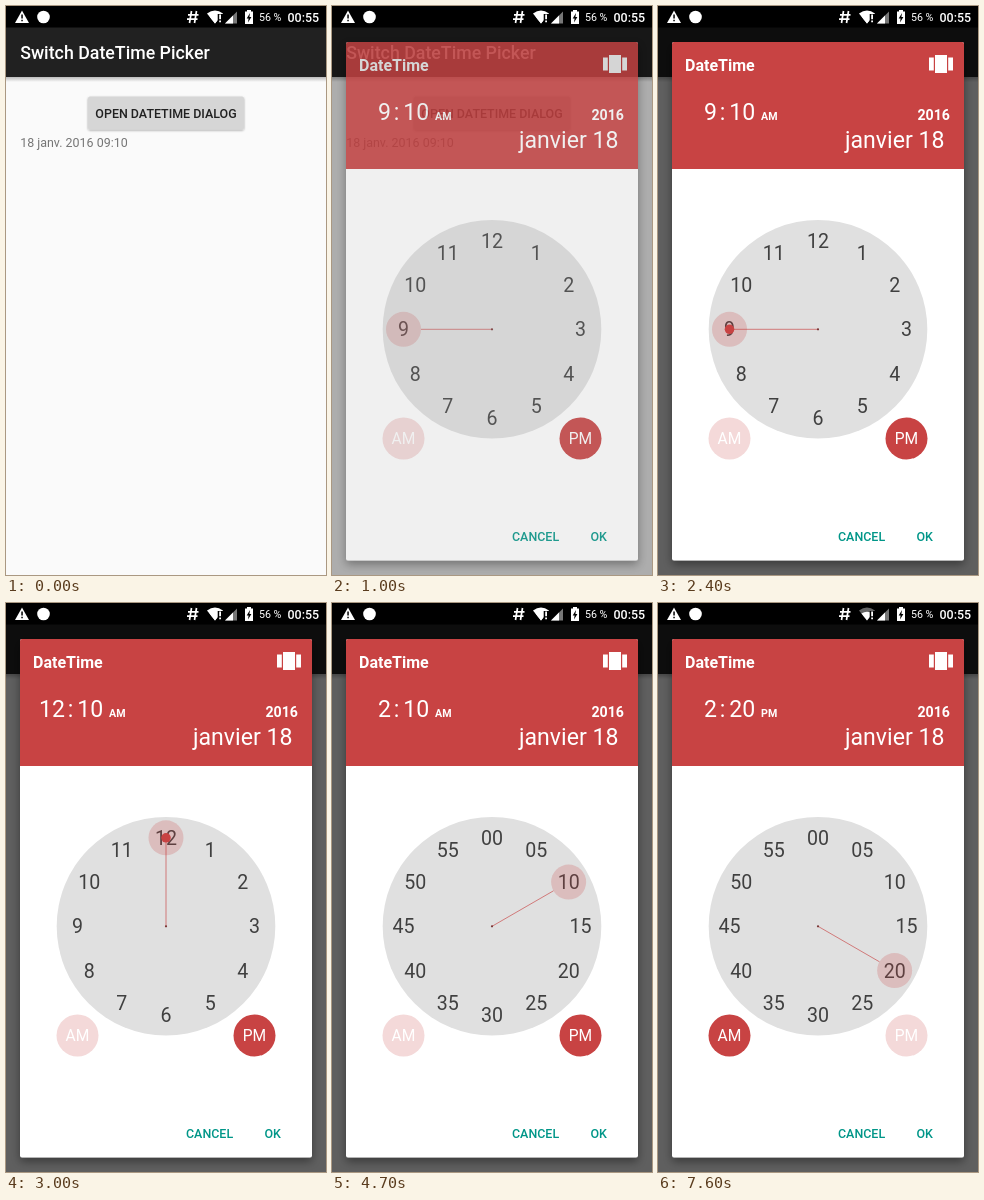
Recreate the animation shown at these times as an HTML page. Size 320 px wide and 569 px high, loop 8 s.

```html
<!DOCTYPE html>
<html lang="fr">
<head>
<meta charset="utf-8">
<title>Switch DateTime Picker</title>
<style>
html, body { margin: 0; width: 100%; height: 100%; overflow: hidden; background: #fafafa; }
svg { display: block; width: 100vw; height: 100vh; font-family: Roboto, sans-serif; }
.m { font-weight: 500; }
.b { font-weight: 700; }
.w { fill: #fff; }
.c { text-anchor: middle; }
.s { font-size: 12.44px; }
.num { font-size: 19.6px; fill: #404040; }
.big { font-size: 23.1px; }
.red { fill: #c84343; }
.half { font-size: 15.6px; }
</style>
</head>
<body>
<svg viewBox="0 0 320 569">
  <defs>
    <linearGradient id="fall" x2="0" y2="1">
      <stop stop-opacity=".25"/><stop offset="1" stop-opacity="0"/>
    </linearGradient>
    <filter id="lift" x="-10%" y="-10%" width="120%" height="120%">
      <feDropShadow dx="0" dy="4" stdDeviation="5" flood-opacity=".4"/>
    </filter>
    <filter id="small" x="-10%" y="-20%" width="120%" height="150%">
      <feDropShadow dx="0" dy="1" stdDeviation=".8" flood-opacity=".35"/>
    </filter>
  </defs>

  <!-- Page -->
  <rect width="320" height="569" fill="#fafafa"/>
  <rect y="71" width="320" height="5" fill="url(#fall)"/>
  <rect width="320" height="71" fill="#212121"/>
  <text class="m w" x="14.2" y="53" font-size="17.78">Switch DateTime Picker</text>
  <rect x="82" y="90.5" width="156" height="33" rx="2" fill="#d6d6d6" filter="url(#small)"/>
  <text class="m s c" x="160" y="111.5" fill="#212121">OPEN DATETIME DIALOG</text>
  <text class="s" x="14.2" y="141" fill="#757575">18 janv. 2016 09:10</text>
  <rect id="dim" width="320" height="569"/>

  <!-- Status bar -->
  <rect width="320" height="21.5"/>
  <g class="w">
    <path d="M16 4.5L23 17H9Z"/>
    <path d="M15.3 8.5h1.5v4h-1.5zM15.3 13.8h1.5v1.5h-1.5z" fill="#000"/>
    <circle cx="37.5" cy="11" r="6.3"/>
    <path d="M185.5 5L183.5 17M190.5 5L188.5 17M182 8.8H192.5M181 13.2H191.5" stroke="#fff" stroke-width="1.7"/>
    <path id="wifi" d="M201 7.5Q209 1.5 217 7.5L209 17.5Z"/>
    <path d="M203.4 10.5Q209 7 214.6 10.5L209 17.5Z"/>
    <path d="M211.7 8h6v10h-6z" fill="#000"/>
    <path d="M213.2 8.5h1.8v4.8h-1.8zM213.2 14.5h1.8v1.8h-1.8z"/>
    <path d="M219 17.5H231V5.5Z" fill="#777"/>
    <path d="M219 17.5H227V9.5Z"/>
    <path d="M239 5.5h2v-1.5h4v1.5h2v12.5h-8z"/>
    <path d="M244 7L240.7 12.5H242.6L242 16.5L245.4 11H243.4Z" fill="#000"/>
    <text x="253" y="15" font-size="10.67">56 %</text>
    <text class="m s" x="281.5" y="15.5">00:55</text>
  </g>

  <!-- Dialog -->
  <g id="dialog">
    <rect x="14" y="36" width="292" height="518.5" rx="2" class="w" filter="url(#lift)"/>
    <path class="red" d="M14 163V38q0-2 2-2H304q2 0 2 2V163Z"/>
    <g class="w">
      <text class="b" x="27" y="65" font-size="16">DateTime</text>
      <path d="M277 49h12v18h-12zM271 51.5h4.8v13h-4.8zM290.2 51.5h4.8v13h-4.8z"/>
      <text id="hour" class="big" x="59" y="114" text-anchor="end"></text>
      <text class="big c" x="64.5" y="114">:</text>
      <text id="minute" class="big c" y="8.2"></text>
      <text id="period" class="b" x="103" y="114" font-size="10.67"></text>
      <text class="b" x="292" y="114" font-size="14.2" text-anchor="end">2016</text>
      <text class="big" x="187" y="142">janvier 18</text>
    </g>
    <circle cx="160" cy="323.3" r="109.3" fill="#e0e0e0"/>
    <g id="am"><circle class="red" cx="71.5" cy="432.5" r="21"/></g>
    <g id="pm"><circle class="red" cx="248.5" cy="432.5" r="21"/></g>
    <text class="half w c" x="71.5" y="438">AM</text>
    <text class="half w c" x="248.5" y="438">PM</text>
    <g id="rings"></g>
    <circle cx="160" cy="323.3" r="1.1" fill="#733"/>
    <g class="m s" fill="#009688">
      <text x="180" y="535">CANCEL</text>
      <text x="258.5" y="535">OK</text>
    </g>
  </g>
</svg>
<script>
const LOOP = 8000, STEP = 100;
const CX = 160, CY = 323.3, R = 88.5, KNOB = 17.5;
const SWITCH = 3780;             // hours give way to minutes
const $ = id => document.getElementById(id);
const pad = n => String(n).padStart(2, '0');
const clamp = x => Math.min(1, Math.max(0, x));
const ease = x => (1 - Math.cos(Math.PI * clamp(x))) / 2;

function add(parent, tag, attrs) {
  const el = document.createElementNS('http://www.w3.org/2000/svg', tag);
  parent.append(el);
  return set(el, attrs);
}
function set(el, attrs) {
  for (const k in attrs) el.setAttribute(k, attrs[k]);
  return el;
}
function polar(deg, r) {
  const a = deg * Math.PI / 180;
  return [CX + r * Math.sin(a), CY - r * Math.cos(a)];
}
// Piecewise linear value through [position, value] pairs
function track(x, keys) {
  const i = keys.findIndex(k => k[0] >= x);
  if (i < 0) return keys[keys.length - 1][1];
  if (i === 0) return keys[0][1];
  const [x0, v0] = keys[i - 1], [x1, v1] = keys[i];
  return v0 + (v1 - v0) * (x - x0) / (x1 - x0);
}

function makeRing(label) {
  const g = add($('rings'), 'g', {});
  const texts = Array.from({ length: 12 }, (_, i) => {
    const el = add(g, 'text', { class: 'num c' });
    el.textContent = label(i);
    return el;
  });
  const knob = add(g, 'circle', { class: 'red', r: KNOB, opacity: .22 });
  const line = add(g, 'line', { x1: CX, y1: CY, stroke: '#c84343', 'stroke-opacity': .65 });
  const dot = add(g, 'circle', { class: 'red', r: 4.8 });
  return (deg, touched, scale, alpha) => {
    const r = R * scale, [x, y] = polar(deg, r);
    const [x2, y2] = polar(deg, touched ? r : r - KNOB);
    set(g, { opacity: alpha });
    texts.forEach((el, i) => {
      const [tx, ty] = polar(i * 30, r);
      set(el, { x: tx, y: ty + 7 });
    });
    set(knob, { cx: x, cy: y });
    set(line, { x2, y2 });
    set(dot, { cx: x, cy: y, opacity: +touched });
  };
}
const hours = makeRing(i => i || 12);
const minutes = makeRing(i => pad(i * 5));

function draw(t) {
  const opening = t < 1100;
  set($('dim'), { opacity: t < 1000 ? 0 : opening ? .31 : .62 });
  set($('dialog'), { opacity: t < 1000 ? 0 : opening ? .82 : 1 });
  set($('wifi'), { fill: t < 7600 ? '#fff' : '#666' });

  const hour = 9 + [2600, 2800, 3000, 3300, 3500].filter(s => t >= s).length;
  const minute = 10 + 2 * Math.round(5 * clamp((t - 5100) / 500));
  $('hour').textContent = (hour - 1) % 12 + 1;
  $('minute').textContent = pad(minute);

  const out = ease((t - SWITCH) / 500);
  hours(hour * 30, t >= 2400 && t < 3700,
    track(out, [[0, 1], [.2, .95], [1, 1.3]]), 1 - out);
  const into = ease((t - SWITCH) / 625);
  minutes(minute * 6, t >= 5100 && t < 5700,
    track(into, [[.2, .7], [.84, 1.05], [1, 1]]), clamp((into - .2) / .8));

  const pulse = track(ease((t - SWITCH - 300) / 544), [[0, 1], [.275, .85], [.69, 1.1], [1, 1]]);
  set($('minute'), { transform: `translate(84.3 105.8) scale(${pulse})` });

  const pm = t >= 6800;
  $('period').textContent = pm ? 'PM' : 'AM';
  set($('am'), { opacity: pm ? 1 : .2 });
  set($('pm'), { opacity: pm ? .2 : 1 });
}

function tick(now) {
  draw(Math.floor(now % LOOP / STEP) * STEP);
  requestAnimationFrame(tick);
}
draw(0);
requestAnimationFrame(tick);
</script>
</body>
</html>
```
